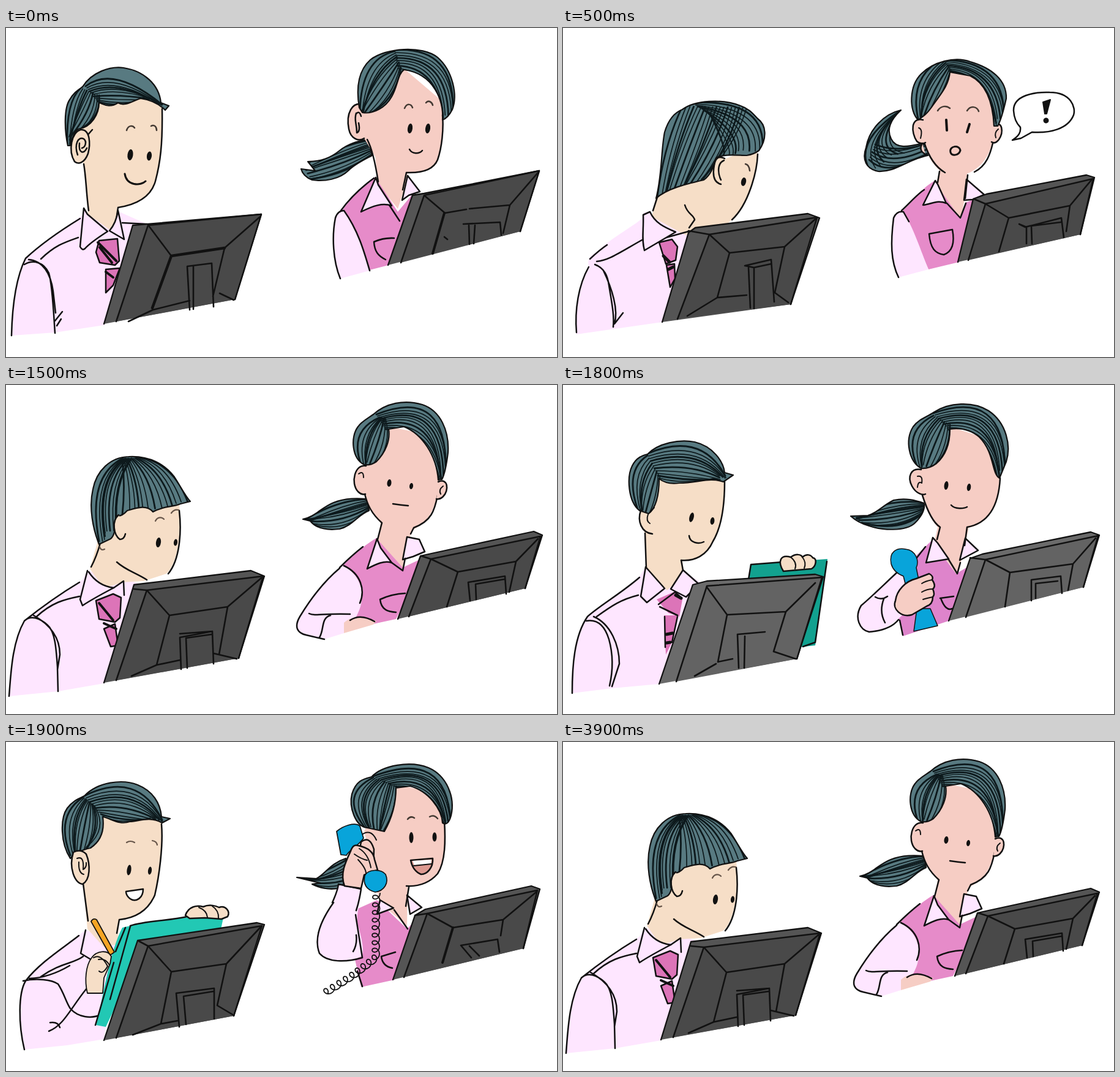
Recreate the animation shown at these times as an HTML page. Size 900 by 537 pixels, loop 4800 ms.

```html
<!DOCTYPE html>
<html lang="en">
<head>
<meta charset="utf-8">
<title>Office phone call</title>
<style>
html, body { margin: 0; width: 100%; height: 100%; overflow: hidden; background: #fff; }
svg { display: block; width: 100%; height: 100%; }
</style>
</head>
<body>
<svg id="stage" viewBox="0 0 900 537" stroke-linecap="round" stroke-linejoin="round"></svg>
<script>
const INK = '#111', SKIN = '#f6dec7', ROSE = '#f6cdc4', SHIRT = '#fee6ff', VEST = '#e68bc9',
  TIE = '#dc74b8', BLUE = '#08a4da', TEAL = '#22c8b4';

const fill = (color, d) => `<path fill="${color}" d="${d}"/>`;
const ink = (d, w = 2.5, color = INK) => `<path fill="none" stroke="${color}" stroke-width="${w}" d="${d}"/>`;
const shape = (color, d, w = 2.5) => `<path fill="${color}" stroke="${INK}" stroke-width="${w}" d="${d}"/>`;
const eye = (x, y, rx = 3.7, ry = 8, tilt = 8) =>
  `<ellipse cx="${x}" cy="${y}" rx="${rx}" ry="${ry}" transform="rotate(${tilt} ${x} ${y})" fill="${INK}"/>`;

let clips = 0;
// Each lock is [curve, curve, count]: strands blend from one quadratic curve to the other.
function hair(d, ...locks) {
  const id = 'hair' + clips++;
  const strands = locks.map(([a, b, count]) => {
    let out = '';
    for (let i = 0; i <= count; i++) {
      const wobble = Math.sin(i * 7.3) * 3;
      const p = a.map((v, k) => (v + (b[k] - v) * i / count + wobble * (k > 1)).toFixed(1));
      out += ink(`M${p[0]} ${p[1]}Q${p[2]} ${p[3]} ${p[4]} ${p[5]}`, 1.7 + 1.1 * (i % 3 === 0), '#0d191c');
    }
    return out;
  }).join('');
  return `<clipPath id="${id}"><path d="${d}"/></clipPath>` + fill('#587a81', d) +
    `<g clip-path="url(#${id})">${strands}</g>` + ink(d, 2.2);
}

// front: bottom left, corner, top right, bottom right of the back panel
const monitor = (outline, front, details, tone = '#494949', edge = '#555') =>
  fill(edge, outline + 'z') + ink(outline, 2.3) +
  `<polyline points="${front}" fill="${tone}" stroke="${INK}" stroke-width="2.5"/>` + ink(details, 2.6);

function coil(points, turns) {
  let d = '';
  const steps = turns * 14;
  for (let i = 0; i <= steps; i++) {
    const s = i / steps * (points.length - 1), k = Math.min(Math.floor(s), points.length - 2), f = s - k;
    const [x, y] = points[k], [u, v] = points[k + 1], a = i / 14 * 2 * Math.PI;
    d += `${i ? 'L' : 'M'}${(x + (u - x) * f + 6 * Math.cos(a)).toFixed(1)} ${(y + (v - y) * f + 6 * Math.sin(a)).toFixed(1)}`;
  }
  return ink(d, 1.8);
}

const calm = [
  // man
  fill(SHIRT, 'M9 502C10 460 15 410 32 376C60 350 90 330 123 307L185 300L230 320L160 485L80 497z'),
  fill(SKIN, 'M115 165L150 115H245L254 130C256 190 252 220 244 250C237 275 215 290 181 293L181 312L172 331L134 304L127 225z'),
  ink('M255 132C256 190 252 220 244 250C237 275 215 288 183 293L180 313M127 222C131 245 131 270 135 298'),
  ink('M9 502C10 460 15 410 32 376C60 350 90 330 121 311M30 386C45 377 62 383 70 400C76 420 78 470 80 498M37 378C60 380 73 400 77 430L81 465M57 377C80 355 95 350 118 342M92 463L80 478M90 475L83 486M190 318L230 320'),
  shape(SHIRT, 'M127 294L121 357Q125 364 129 360C138 350 152 341 166 332L133 304z'),
  shape(SHIRT, 'M183 298L193 345L169 331Q180 318 183 298'),
  shape(TIE, 'M152 347L182 344L185 380L178 387L153 383L147 366z'),
  shape(TIE, 'M163 394L186 392L175 420L163 432z'),
  ink('M150 350L180 380M153 358L173 383M163 398L175 407', 4),
  hair('M101 192C95 165 95 130 104 117C110 106 118 101 125 96C140 72 170 62 192 65C225 70 250 92 253 122L266 127L260 134C250 124 235 117 220 115C208 118 194 129 183 122C168 132 158 123 152 122C152 140 140 162 118 165C110 170 107 185 105 192z',
    [[122, 98, 98, 120, 100, 190], [152, 110, 155, 150, 112, 168], 9], [[130, 95, 175, 60, 255, 125], [150, 120, 190, 132, 225, 112], 9]),
  shape(SKIN, 'M112 218C101 200 107 170 122 166C138 165 138 190 134 205C128 221 118 223 112 218z'),
  ink('M117 207C111 190 118 176 127 181C133 186 129 195 124 196M120 188C118 204 127 207 132 196M134 174L141 166'),
  ink('M197 167C200 158 207 159 210 163M237 160C242 157 246 161 246 167', 2.5, '#443a33'),
  eye(203, 207, 4.5, 9), eye(234, 209, 4, 7.5), ink('M194 238C197 258 220 258 228 250', 3),
  monitor('M160 483L207 322L417 304L374 443', '180 479 232 322 417 304 374 443',
    'M234 324L270 372L357 359L415 308M357 359L338 438M200 479L240 460L300 445M349 433L372 444M300 460L296 389L336 384L339 455M306 389V459'),
  ink('M357 359L270 372L239 457', 4.5),
  // woman
  hair('M598 208C585 215 570 222 560 232C545 247 520 251 500 248C490 244 484 238 482 230L505 233L493 218C515 218 530 212 545 200C560 188 575 185 592 181z',
    [[595, 183, 550, 190, 490, 222], [598, 208, 550, 240, 495, 246], 9]),
  fill(ROSE, 'M582 135L645 62L713 120C715 165 712 195 705 215C698 232 675 238 656 236L650 265L640 295L608 255L603 210L585 180z'),
  fill(VEST, 'M550 297C565 275 585 255 603 243L640 300L665 270L625 387L594 395L552 298z'),
  fill(SHIRT, 'M546 409C534 380 532 340 538 310Q542 298 552 298C575 330 585 365 594 396z'),
  ink('M546 409C534 380 532 340 538 310Q542 298 552 298C575 330 585 365 594 396M547 298C563 276 583 258 601 245M634 343Q617 342 601 349C602 365 608 372 620 378M626 289L643 315'),
  shape(SHIRT, 'M604 244L580 300C600 290 615 285 630 290L608 256z'),
  shape(SHIRT, 'M656 241L676 267L658 273L647 281z'),
  ink('M590 182Q600 200 608 251M713 142C715 165 712 195 705 215C698 232 678 237 654 236L648 264'),
  shape(ROSE, 'M584 125C565 119 555 140 560 165C563 180 575 186 585 180'),
  ink('M572 140Q577 134 580 144M572 139C568 150 573 155 573 171Q579 169 576 155'),
  hair('M577 130C572 100 575 70 595 52C620 32 680 28 705 48C730 70 738 110 729 133Q722 147 713 150C715 120 700 75 650 68C640 75 640 95 630 112C620 130 600 141 582 138z',
    [[635, 38, 580, 50, 578, 137], [645, 65, 635, 120, 590, 140], 9], [[635, 36, 735, 30, 730, 140], [640, 66, 700, 70, 712, 148], 7]),
  ink('M651 131C655 122 662 124 664 130M686 122C690 117 696 121 697 126', 2.5, '#443a33'),
  eye(660, 164, 4), eye(689, 164, 4), ink('M659 198C663 206 675 206 680 200'),
  monitor('M624 387L664 273L683 270L871 233L840 332', '645 383 683 273 871 233 840 332',
    'M684 274L717 302L752 296M757 295L823 289L869 236M823 289L812 335M757 353L756 322M747 320L807 317L809 338M766 322L764 352M716 341L721 345'),
  ink('M716 302L697 368', 4)
];

const surprise = [
  // man
  fill(SHIRT, 'M22 500C19 460 25 420 42 390Q38 372 55 366C75 345 105 330 128 312L133 300L215 330L162 480z'),
  fill(SKIN, 'M152 275L235 225L300 200L318 204C318 235 305 290 270 318L200 338L145 308z'),
  ink('M318 206C317 235 303 288 276 313M156 270L147 298M199 289C204 305 213 304 215 313L206 326'),
  ink('M22 497C19 460 25 420 42 390M44 377Q60 362 72 354M55 381C75 379 90 368 129 346M52 386C68 392 73 405 75 420C80 450 84 470 82 488M66 396C80 425 91 460 84 483L98 465M165 343L205 332'),
  shape(SHIRT, 'M142 300C150 318 165 325 184 333L133 363C128 345 132 330 131 305z'),
  shape(TIE, 'M157 350L178 345L187 357L184 379L168 385z'), shape(TIE, 'M169 387L182 385L183 409L175 423z'),
  ink('M164 372L174 382M172 394L180 390', 5),
  hair('M152 278C162 240 160 200 166 170C172 150 182 138 195 133C215 118 260 115 290 127C305 132 312 142 318 148C332 158 334 180 320 200Q312 206 300 208C285 208 262 205 250 212C246 225 243 238 230 248C200 255 170 262 152 278z',
    [[195, 128, 165, 190, 154, 276], [300, 130, 285, 195, 232, 247], 17], [[210, 122, 330, 115, 326, 195], [240, 140, 270, 200, 260, 210], 9]),
  shape(SKIN, 'M264 213Q250 206 247 224C244 240 246 252 258 255'), ink('M263 216C250 222 254 240 258 248'),
  ink('M298 222Q304 223 305 233', 2.5, '#443a33'), eye(295, 251, 4, 7, 12),
  monitor('M162 480L205 334L216 326L400 303L419 310L372 451', '187 475 239 337 415 309 372 451',
    'M205 331L239 337L272 367L362 357L412 312M272 367L252 440L203 470M252 440L300 436M362 357L346 432L368 448M306 457L303 391M297 388L340 378L345 447M297 388L312 391L340 385M312 391V458'),
  // woman
  hair('M552 134C525 140 500 165 495 195C488 215 495 230 515 234C545 235 560 215 600 207L590 188C570 192 545 200 536 181C528 165 535 150 552 134z',
    [[552, 134, 475, 185, 500, 230], [545, 140, 515, 195, 555, 202], 7], [[500, 215, 530, 245, 595, 206], [510, 190, 545, 205, 592, 190], 6]),
  fill(ROSE, 'M588 145L632 68L690 85L706 160C702 200 690 225 660 238L656 280L650 310L608 262L615 232C595 215 588 190 588 150z'),
  fill(VEST, 'M555 298C575 280 585 262 606 250L650 312L657 285L685 275L647 382L597 394z'),
  fill(SHIRT, 'M548 407C535 380 535 350 540 310Q545 298 556 300C572 325 585 365 597 394z'),
  ink('M548 407C535 380 535 350 540 310Q545 298 556 300L565 316M553 298C568 284 580 270 590 264M598 336L636 329C640 350 636 365 622 370C608 368 600 360 598 336'),
  shape(SHIRT, 'M608 249L588 289C603 287 612 280 626 286L612 255z'), shape(SHIRT, 'M659 247L688 272L670 280L655 281z'),
  ink('M627 286L649 310L658 286M615 234L612 252M661 240L657 278M590 187C598 212 610 228 624 236M702 188C698 205 692 225 672 235'),
  shape(ROSE, 'M588 150C568 145 568 170 578 185Q585 191 592 187'), shape(ROSE, 'M704 158C718 151 720 170 712 182Q706 190 700 186'),
  shape(ROSE, 'M587 188Q580 200 592 206'), ink('M581 163Q588 165 584 180M711 165Q704 171 707 179', 2),
  hair('M580 150C565 135 565 95 585 75C605 55 640 46 665 55C700 65 725 85 724 115Q717 147 710 160L704 160C702 120 690 90 665 78L632 72C630 95 615 110 605 125C595 140 588 145 580 150z',
    [[620, 50, 565, 80, 580, 148], [635, 70, 625, 110, 595, 142], 9], [[625, 52, 720, 55, 720, 140], [632, 73, 690, 80, 706, 158], 7]),
  ink('M612 135C617 127 626 126 632 131M660 135C666 126 676 128 679 136', 2.5, '#443a33'),
  ink('M626 150L627 167M664 157L660 170', 4), ink('M633 203C630 192 648 190 649 200C646 209 635 209 633 203', 3),
  shape('#fff', 'M736 135C735 110 770 104 795 105C830 105 838 130 834 142C825 165 795 172 766 170L748 180L734 183C745 176 748 170 747 162Q737 152 736 135z'),
  shape(INK, 'M784 121L796 117L790 140L787 140z', 2), eye(789, 151, 4.5, 4.5),
  monitor('M645 382L670 279L692 271L855 240L868 244L845 337', '662 379 690 287 866 246 845 337',
    'M671 279L690 287L728 310L828 290L864 247M728 310L712 365M828 290L822 332M757 352V325L745 320L755 325L814 310L818 342M766 352L765 323L813 317')
];

const alert = [
  // man
  fill(SHIRT, 'M5 508C8 470 10 420 30 385C55 365 90 340 125 318L133 303L215 323L160 487L85 500z'),
  fill(SKIN, 'M150 255L190 200L283 194C287 235 282 290 262 308L225 320L190 322L160 332L137 300z'),
  ink('M283 205C287 240 284 285 265 308M154 258Q148 280 139 297M181 289C195 302 213 307 230 318'),
  ink('M5 508C8 470 10 420 30 385C55 365 90 340 120 322M30 385C40 375 55 380 68 392C80 402 82 430 84 460L85 500M45 376C70 390 88 410 88 440L84 465M50 378C75 355 95 350 120 345'),
  shape(SHIRT, 'M133 303L121 350L125 360C140 350 155 342 176 331Q150 328 135 305'), ink('M176 331L192 320L193 343'),
  shape(TIE, 'M147 352L175 341L188 347L186 380L178 387L152 382z'), shape(TIE, 'M160 398L178 390L183 425L171 427z'),
  ink('M152 356L175 384M160 389L180 398', 4),
  hair('M152 260C142 235 135 200 142 170C148 140 170 118 200 117C235 115 260 130 275 150C285 165 292 180 301 190L285 194C270 200 258 197 240 207C230 195 215 200 198 205Q188 216 180 213C178 235 178 245 171 251z',
    [[190, 120, 132, 150, 152, 255], [205, 120, 175, 160, 180, 230], 9], [[190, 122, 195, 165, 190, 212], [220, 118, 275, 130, 298, 192], 12]),
  shape(SKIN, 'M184 212C172 222 176 245 186 252Q193 252 195 243'),
  ink('M244 222C248 214 255 216 258 219M270 209Q275 202 282 204M153 264Q155 271 161 268', 2.2, '#665549'),
  eye(249, 257, 4, 8), eye(277, 257, 3, 5.5),
  monitor('M160 486L209 326L400 303L422 312L380 446', '180 482 230 335 420 312 380 446',
    'M209 333L230 335L267 376L362 362L417 315M267 376L246 457M205 475L246 457L284 449M362 362L348 440M339 438L377 447M286 464L284 412L337 402L339 455M284 406L337 402M296 462L294 413L336 407'),
  // woman
  hair('M485 219C505 215 515 200 535 192C555 184 575 185 590 186L593 205C575 212 565 230 545 235C520 238 505 232 497 222z',
    [[592, 186, 540, 188, 490, 219], [592, 205, 550, 240, 495, 224], 8]),
  fill(ROSE, 'M586 130L625 68L685 80L708 157C702 195 697 220 665 236L652 265L648 300L606 258L612 225C597 210 588 190 586 175z'),
  fill(VEST, 'M550 295C570 275 590 258 605 250L648 298L690 278L637 382L600 390L565 380z'),
  fill(SHIRT, 'M552 295C525 315 500 345 480 378C470 395 476 405 490 408L520 415L552 405L572 378C588 350 585 315 552 295z'),
  fill(ROSE, 'M552 388C565 375 585 380 605 385L600 391L552 405z'),
  ink('M545 299C520 320 500 345 480 378C470 395 476 405 490 408L520 415M545 298Q565 278 583 264M552 295C580 308 587 335 578 356M495 373C505 378 520 372 562 374M512 412C520 400 514 380 530 376M562 384C575 375 590 379 602 386M652 340Q630 341 611 350C613 368 625 370 637 371'),
  shape(SHIRT, 'M606 251L590 300C605 292 618 286 630 290L612 266z'), shape(SHIRT, 'M655 248L675 252L684 272L665 280L648 285z'),
  ink('M586 178C590 195 597 210 614 225L607 252M705 180C700 205 695 222 666 233L661 243M630 290L648 303L652 283'),
  shape(ROSE, 'M588 132C570 128 562 160 575 174Q581 180 587 178'), shape(ROSE, 'M706 158C722 151 724 172 714 182Q709 187 703 186'),
  ink('M576 145Q584 139 584 151M714 165Q706 171 710 178', 2),
  hair('M585 130C565 120 562 85 575 68C580 60 590 55 600 48C620 30 650 23 680 32C710 42 724 75 722 110Q718 143 712 154L706 155C703 115 680 80 650 68L625 72C628 90 620 110 605 125Q595 132 585 130z',
    [[610, 53, 560, 75, 580, 130], [620, 55, 628, 95, 600, 128], 8], [[605, 48, 725, 0, 718, 150], [620, 72, 690, 70, 707, 154], 9]),
  eye(626, 160, 3.5, 6), eye(662, 165, 3, 5), ink('M632 194Q645 196 657 197'),
  monitor('M640 382L677 279L695 275L862 239L876 245L848 332', '658 378 694 284 873 247 848 332',
    'M678 279L694 284L738 305L833 288L869 251M738 305L720 362M833 288L822 338M758 352L755 322L815 312L817 341M768 350L767 325L814 317')
];

const GREY = ['#636363', '#6b6b6b'];
const reach = [
  // man
  fill(SHIRT, 'M15 503C15 460 18 410 40 378C60 360 95 340 125 312L133 300L198 305L230 325L157 488L80 495z'),
  fill(SKIN, 'M127 205L160 150L264 154C264 195 260 230 245 255C235 278 215 288 195 287L198 310L170 335L136 302L133 242z'),
  ink('M264 158C264 195 260 230 245 255C235 278 215 288 193 286L197 308M134 242L136 300'),
  ink('M15 503C15 460 18 410 40 378C60 360 95 340 125 314M38 385C55 382 68 392 75 415C82 440 82 465 76 491M50 378C78 390 92 425 92 455L80 492M55 378C80 360 95 350 123 343'),
  shape(SHIRT, 'M135 297L127 345L137 355L166 332z'), shape(SHIRT, 'M196 302L222 325L201 346L176 333z'),
  fill(TIE, 'M153 350L183 337L195 350L190 378L172 372z'), fill(TIE, 'M165 376L187 376L178 420L168 440z'),
  ink('M156 358L183 338L194 348M158 362L187 376M166 378L167 428M187 378L178 420'), ink('M184 343L193 348M169 407L179 405M169 421L175 420', 5),
  hair('M125 205C106 190 104 150 113 132C120 118 130 115 138 113C155 95 190 88 215 93C245 100 262 125 264 143L278 147L262 158C240 150 220 160 190 160Q170 163 157 153C157 180 152 200 140 210z',
    [[138, 115, 100, 140, 122, 203], [158, 150, 158, 190, 140, 210], 8], [[138, 112, 225, 75, 265, 148], [157, 152, 200, 165, 250, 154], 10]),
  shape(SKIN, 'M127 205C121 222 128 241 146 243'), ink('M139 211Q135 222 142 226M142 208L149 200', 2),
  eye(210, 216, 3.6, 8, 14), eye(244, 222, 3.4, 6), ink('M206 246C207 258 222 260 230 256'),
  fill('#12a18f', 'M306 293L432 284L412 425L385 428L303 317z'), ink('M303 317L307 293L358 289M431 288L412 420L392 427'),
  shape(SKIN, 'M360 304C350 288 355 276 372 281C380 275 389 276 391 281C398 275 405 277 408 282C416 283 413 296 406 300z'),
  ink('M372 281Q383 290 379 300M391 281Q398 290 394 299', 2),
  monitor('M157 488L212 326L235 320L412 309L425 313L382 447', '185 484 235 328 423 314 382 447',
    'M235 330L268 375L364 370L412 323M268 375L253 452L277 447M215 475L250 455M364 370L344 435L380 447M287 462L285 407L330 403M296 462L297 410', ...GREY),
  // woman
  hair('M470 214L498 213C515 208 520 198 540 188C560 184 575 188 590 193Q592 208 575 225C560 240 520 237 500 230Q482 225 470 214z',
    [[590, 192, 530, 185, 475, 214], [588, 210, 550, 245, 490, 226], 10]),
  fill(ROSE, 'M585 135L632 68L685 85L713 152C712 190 700 225 663 233L655 265L645 312L606 258L612 232C597 215 590 195 585 175z'),
  fill('#de84cb', 'M555 300L602 254L642 308L690 280L630 385L555 410L548 380z'),
  fill(SHIRT, 'M552 298C530 320 505 345 487 360C475 380 485 400 500 403C530 400 545 385 560 370L582 320z'),
  ink('M552 300C530 320 505 345 487 360C475 380 485 400 500 403C525 401 540 393 548 383M510 346Q520 352 530 345M524 349Q516 370 526 388M550 384L555 408M570 292L592 264M616 348L638 345M617 348Q625 370 636 365'),
  shape(SHIRT, 'M604 249L593 290L630 284L612 258z'), shape(SHIRT, 'M657 250L678 270L648 286z'),
  ink('M587 180C595 205 605 225 616 232L611 252M714 152C712 190 700 225 660 232L656 262M630 285L644 308L649 290'),
  shape(ROSE, 'M585 138C568 135 562 150 570 165C577 178 588 180 592 178'), ink('M579 149Q588 147 586 160Q580 156 579 167', 2),
  hair('M585 136C565 125 558 90 572 68C582 55 595 52 605 45C630 28 670 26 695 42C725 62 732 100 724 125L713 152C700 145 705 110 680 85Q660 68 632 72C632 95 625 115 610 128Q598 137 585 136z',
    [[605, 50, 555, 75, 578, 132], [632, 65, 632, 110, 602, 134], 9], [[605, 46, 720, 5, 722, 135], [630, 73, 695, 70, 708, 150], 9]),
  eye(626, 164, 3.4, 7), eye(663, 167, 3.2, 6), ink('M634 196C640 203 655 202 660 199'),
  shape(BLUE, 'M536 292C532 272 545 265 560 268C577 270 582 288 577 298L583 328L562 336L556 312Q540 306 536 292z', 1.5),
  shape(BLUE, 'M578 365L573 402L612 393L600 365z', 1.5),
  shape(ROSE, 'M543 352C545 335 560 320 577 316L598 308Q606 312 603 318Q610 328 604 333Q608 342 604 346Q604 358 594 361L570 375C553 380 537 366 543 352z'),
  ink('M603 318Q592 320 586 324M604 333Q594 333 586 338M604 346Q594 348 588 350', 2),
  monitor('M630 385L665 283L685 276L862 240L876 245L850 330', '658 379 690 285 874 246 850 330',
    'M665 282L690 285L730 306L833 292L870 250M730 306L722 362M833 292L825 335M765 352V318L813 312L815 340M772 348V324L808 320', ...GREY)
];

const call = [
  // man
  fill(SHIRT, 'M30 502C20 460 20 410 32 390C55 360 95 335 122 313L130 307L185 325L160 485L100 495z'),
  fill(SKIN, 'M110 185L158 118L254 128C257 170 250 220 243 250C230 280 205 290 185 290L182 330L160 335L133 305L126 230z'),
  ink('M254 134C257 170 250 220 243 250C230 280 205 288 185 290L181 312M126 231L134 292'),
  ink('M30 502C20 460 20 410 32 390C55 360 95 335 119 316M28 390C50 385 75 388 85 395M57 383C90 360 110 362 126 350M38 386Q70 385 104 365M70 472C95 462 105 435 132 402M72 458Q85 456 88 466M85 395C95 410 98 425 105 435C118 450 140 452 155 445'),
  ink('M130 307L122 345L137 354'),
  hair('M105 190C89 165 88 125 100 108C110 95 120 92 128 88C150 65 190 60 215 70C240 80 252 100 254 122L268 125L255 132C235 120 215 130 202 130C185 136 172 125 158 122C162 150 150 165 138 173Q115 178 105 190z',
    [[126, 90, 80, 120, 105, 185], [145, 105, 170, 145, 135, 174], 11], [[128, 88, 215, 45, 255, 127], [158, 121, 185, 138, 238, 126], 10]),
  shape(SKIN, 'M110 180C102 205 112 230 125 232C138 225 138 200 131 183Q122 174 110 180z'), ink('M116 190Q128 185 126 208Q132 205 131 197M119 196Q118 214 127 216', 2),
  ink('M197 164Q203 160 210 164M239 161Q246 162 247 168', 2.2, '#665549'),
  eye(201, 209, 3.5, 8.5), eye(235, 210, 3, 6.5), shape('#fff', 'M196 244L224 240C224 255 212 262 203 256Q196 251 196 244z'),
  fill(TEAL, 'M203 300C220 292 260 292 300 286L355 287L350 310L230 325L163 465L147 462C160 410 170 340 190 303z'),
  ink('M203 300C225 292 265 292 296 285M195 303L179 342M176 360L146 462M203 301L170 420'),
  shape('#f5a524', 'M139 293Q142 287 148 290L177 343L170 348z', 1.7),
  shape(SKIN, 'M133 410C128 390 130 365 140 352C148 341 166 338 172 350L170 362L160 385L158 410z', 1.8), ink('M143 352Q155 345 166 366Q158 380 152 374M151 355Q162 352 169 364', 2),
  shape(SKIN, 'M293 283C298 268 312 266 322 269C333 264 344 268 348 270C358 266 367 276 362 285L352 289L325 287L300 288z'), ink('M315 270Q328 275 329 286M337 268Q348 275 347 288', 2),
  monitor('M160 487L215 324L410 295L422 298L372 447', '180 483 232 333 418 300 372 447',
    'M217 325L232 333L270 375L360 362L415 303M270 375L253 460M207 478L253 460L280 455M360 362L345 430L372 446M283 465L278 410L340 402V452M294 461L290 415L339 407'),
  // woman
  hair('M475 221L507 223C522 215 530 198 555 190L560 235C535 243 515 240 500 232L513 230z',
    [[560, 190, 520, 215, 480, 222], [560, 235, 530, 242, 502, 231], 8]),
  fill(ROSE, 'M585 145L637 70L690 80L716 125C718 160 718 195 705 215C690 232 670 237 656 236L655 300L610 262L605 235z'),
  fill(VEST, 'M568 275L606 258L655 305L680 280L635 388L580 400L570 355z'),
  fill(SHIRT, 'M543 232L580 240C578 270 571 280 575 300C584 330 585 345 580 350C555 362 525 360 512 345C502 320 515 290 533 265z'),
  ink('M535 262C515 290 502 320 512 345C525 360 555 360 582 352L571 282M533 262Q542 242 543 232L580 240Q577 260 572 275M572 315Q574 330 567 342M574 374L582 399M636 343L613 350Q615 366 631 369'),
  shape(SHIRT, 'M611 258L606 281L633 271z'), shape(SHIRT, 'M655 250L679 270L660 281z'), ink('M634 274L656 305M658 237L653 268'),
  ink('M716 128C718 160 718 195 705 215C690 232 672 236 654 235'),
  hair('M590 140C570 138 560 105 565 85C572 62 585 60 597 57C615 38 660 30 690 42C720 55 734 90 727 120Q722 138 713 132C712 110 690 80 660 72L637 75C637 100 630 125 618 146z',
    [[600, 58, 545, 85, 585, 138], [637, 72, 640, 110, 618, 146], 12], [[600, 56, 720, 10, 726, 130], [637, 74, 690, 70, 714, 132], 9]),
  ink('M656 126Q661 120 667 124M692 122Q699 118 705 125', 2.5, '#443a33'), eye(662, 156, 3.5, 9, 0), eye(700, 155, 3.5, 7.5, 0),
  shape('#dd9a91', 'M661 193L697 190C698 205 688 216 678 216C668 212 663 203 661 193z'), fill('#fff', 'M664 194L695 192L694 199L667 201z'), ink('M666 202L695 199', 2),
  ink('M580 152Q596 140 605 160', 2), shape(ROSE, 'M580 163Q594 152 601 175L600 205L575 190z'),
  shape(BLUE, 'M540 146C550 137 570 130 578 137L584 157C575 170 562 175 556 185L547 184z', 1.7),
  shape(ROSE, 'M553 235C545 215 555 195 563 178Q567 166 575 169Q600 174 602 192L607 209L585 217L580 239z'),
  ink('M577 174Q592 183 596 205M569 183Q580 191 590 193M575 192Q589 207 588 216', 2),
  shape(BLUE, 'M586 218C592 207 612 207 620 216C626 230 618 243 603 245C588 241 583 232 586 218z', 1.7),
  coil([[605, 247], [604, 300], [604, 352], [565, 382], [520, 410]], 17),
  monitor('M632 388L668 283L685 273L858 235L872 240L845 337', '650 384 688 280 868 242 845 337',
    'M668 283L688 280L730 303L812 290L866 245M812 290L808 316M760 352L743 332L803 322L806 343M773 349L757 333'),
  ink('M730 303L713 360', 4)
];

const poses = [calm, surprise, alert, reach, call];
const timeline = [[0, 0], [500, 1], [1500, 2], [1600, 3], [1700, 2], [1800, 3], [1900, 4], [3900, 2]];
const LOOP = 4800;

const stage = document.getElementById('stage');
stage.innerHTML = poses.map(parts => `<g display="none">${parts.join('')}</g>`).join('');
const groups = [...stage.children];

function draw(time) {
  const current = timeline.filter(([start]) => start <= time).pop()[1];
  groups.forEach((group, i) => group.setAttribute('display', i === current ? 'inline' : 'none'));
}

const begin = performance.now();
function tick() {
  draw((performance.now() - begin) % LOOP);
  requestAnimationFrame(tick);
}
tick();
</script>
</body>
</html>
```
